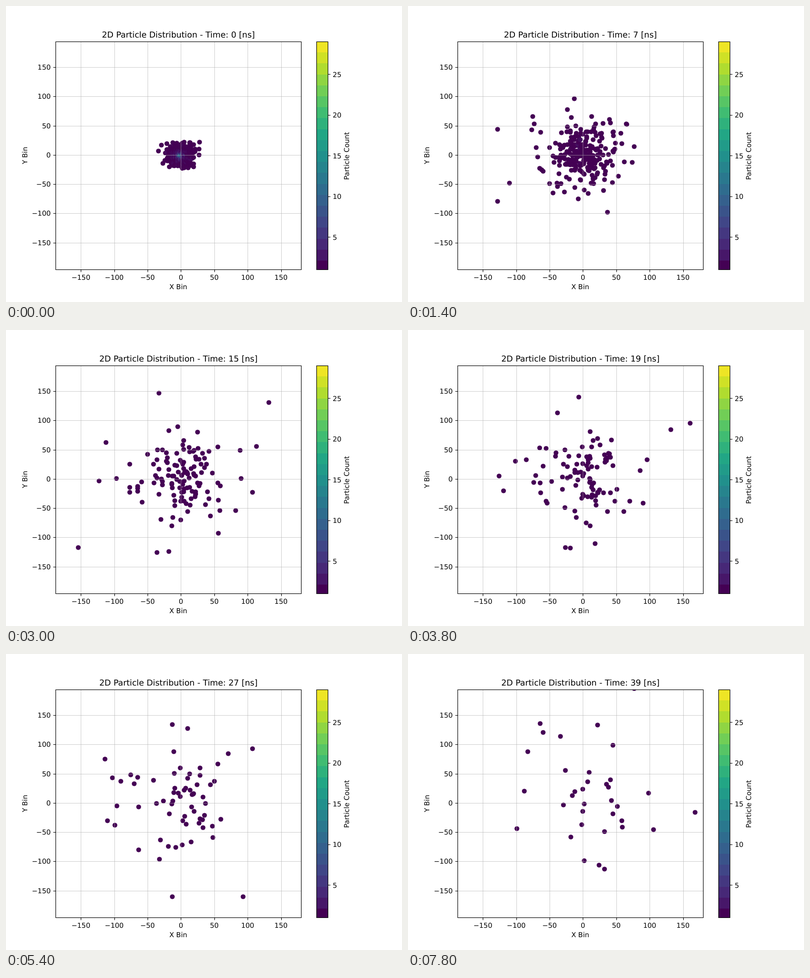
These frames come from a looping animation (800 px wide and 600 px high, 8 s). An HTML page with a canvas:

```html
<!DOCTYPE html>
<html lang="en">
<head>
<meta charset="utf-8">
<title>2D Particle Distribution</title>
<style>
  html, body { margin: 0; width: 100%; height: 100%; overflow: hidden; background: #fff; }
  canvas, svg { position: absolute; left: 0; top: 0; }
  text { font: 13.89px "DejaVu Sans", sans-serif; text-anchor: middle; text-rendering: geometricPrecision; }
  #title { font-size: 16.67px; }
</style>
</head>
<body>
<canvas id="dots" width="800" height="600"></canvas>
<svg id="chart" width="800" height="600" viewBox="0 0 800 600"></svg>
<script>
const STEP_MS = 200, STEPS = 40;
const PARTICLES = 1400, START_SPREAD = 3.8, STEP_SPREAD = 6.5, MAX_VARIANCE = 3.6;
const BOX = { x: 100, y: 72, w: 496, h: 462 };
const VIRIDIS = ['440154', '482475', '414487', '355f8d', '2a788e', '21918c',
  '22a884', '44bf70', '7ad151', 'bddf26', 'fde725']
  .map(hex => [0, 2, 4].map(i => parseInt(hex.slice(i, i + 2), 16)));

const toX = bin => 353.4 + bin * 1.348;
const toY = bin => 301.95 - bin * 1.185;
const crisp = v => Math.round(v) + 0.5;

function viridis(t) {
  const p = Math.min(Math.max(t, 0), 1) * (VIRIDIS.length - 1);
  const i = Math.min(Math.floor(p), VIRIDIS.length - 2);
  return `rgb(${VIRIDIS[i].map((c, k) => Math.round(c + (VIRIDIS[i + 1][k] - c) * (p - i)))})`;
}

function seededRandom(seed) {
  return () => {
    seed = (seed + 0x6D2B79F5) | 0;
    let r = Math.imul(seed ^ (seed >>> 15), 1 | seed);
    r = (r + Math.imul(r ^ (r >>> 7), 61 | r)) ^ r;
    return ((r ^ (r >>> 14)) >>> 0) / 4294967296;
  };
}
const random = seededRandom(2718);
const normal = () => Math.sqrt(-2 * Math.log(1 - random())) * Math.cos(2 * Math.PI * random());

// Pairs recombine quickly while the cloud is dense; later, particles slowly drop out.
const aliveAt = step => Math.round(PARTICLES / (1 + 0.6 * step) * Math.exp(-((step / 58) ** 2)));

// A random walk; its scale differs per particle, giving the cloud a dense core and long tails.
function makeWalk() {
  const variance = normal() ** 2 / 2 - Math.log(1 - random());
  const scale = Math.sqrt(2 * Math.min(MAX_VARIANCE, variance));
  let x = 0, y = 0;
  return Array.from({ length: STEPS }, (_, step) => {
    const spread = scale * (step ? STEP_SPREAD : START_SPREAD);
    x += spread * normal();
    y += spread * normal();
    return [x, y];
  });
}
const walks = Array.from({ length: PARTICLES }, makeWalk);

function binnedDots(step) {
  const bins = new Map();
  for (const walk of walks.slice(0, aliveAt(step))) {
    const [x, y] = walk[step].map(Math.round);
    const key = `${x},${y}`;
    const bin = bins.get(key) || { x, y, count: 0 };
    bin.count++;
    bins.set(key, bin);
  }
  return [...bins.values()].sort((a, b) => a.x - b.x || a.y - b.y);
}

const chart = document.getElementById('chart');
function add(tag, attrs, text = '') {
  const el = document.createElementNS('http://www.w3.org/2000/svg', tag);
  for (const name in attrs) el.setAttribute(name, attrs[name]);
  el.textContent = text;
  return chart.appendChild(el);
}
const line = (x1, y1, x2, y2, stroke = '#000', width = 1.1) =>
  add('line', { x1, y1, x2, y2, stroke, 'stroke-width': width });
const label = (x, y, text, attrs = {}) => add('text', { x, y, ...attrs }, text);
const sideLabel = (x, y, text) => label(0, 0, text, { transform: `translate(${x} ${y}) rotate(-90)` });
const frame = (x, y, width, height) =>
  add('rect', { x, y, width, height, fill: 'none', stroke: '#000', 'stroke-width': 1.1 });
const anchor = side => ({ style: `text-anchor:${side}` });

function drawAxes() {
  const right = BOX.x + BOX.w, bottom = BOX.y + BOX.h, grid = 'rgba(176,176,176,.6)';
  for (let v = -150; v <= 150; v += 50) {
    const x = crisp(toX(v)), y = crisp(toY(v)), text = String(v).replace('-', '\u2212');
    line(x, BOX.y, x, bottom, grid, 1);
    line(BOX.x, y, right, y, grid, 1);
    line(x, bottom + 0.5, x, bottom + 5.4);
    line(BOX.x - 4.4, y, BOX.x + 0.5, y);
    label(toX(v), 555, text);
    label(90.3, Math.round(toY(v) + 5), text, anchor('end'));
  }
  frame(BOX.x + 0.5, BOX.y + 0.5, BOX.w, BOX.h);
  label(348, 574, 'X Bin');
  sideLabel(43, 303, 'Y Bin');
}

function drawColorbar() {
  const bands = 20, size = 22.2;
  add('rect', { x: 627, y: 516, width: 23, height: 18, fill: viridis(0) });
  for (let i = 0; i < bands; i++) {
    const top = Math.round(BOX.y + i * size), end = Math.round(BOX.y + (i + 1) * size);
    add('rect', { x: 627, y: top, width: 23, height: end - top, fill: viridis(1 - (i + 0.5) * size / BOX.h) });
  }
  frame(627.5, BOX.y + 0.5, 23, BOX.h);
  for (let v = 5; v <= 25; v += 5) {
    const y = BOX.y + BOX.h - (v - 1) * 16.5;
    line(650.5, crisp(y), 655.4, crisp(y));
    label(660, Math.round(y + 5.7), v, anchor('start'));
  }
  sideLabel(693, 304, 'Particle Count');
}

drawAxes();
drawColorbar();
const title = label(348.3, 64, '', { id: 'title' });

const ctx = document.getElementById('dots').getContext('2d');
ctx.beginPath();
ctx.rect(BOX.x, BOX.y, BOX.w, BOX.h);
ctx.clip();

function draw(step) {
  title.textContent = `2D Particle Distribution - Time: ${step} [ns]`;
  ctx.clearRect(0, 0, 800, 600);
  for (const { x, y, count } of binnedDots(step)) {
    ctx.fillStyle = viridis((count - 1) / 28);
    ctx.beginPath();
    ctx.arc(Math.round(toX(x)), Math.round(toY(y)), 4.86, 0, 2 * Math.PI);
    ctx.fill();
  }
}

const start = performance.now();
let shown = -1;
function tick() {
  const step = Math.floor((performance.now() - start) / STEP_MS) % STEPS;
  if (step !== shown) draw(shown = step);
  requestAnimationFrame(tick);
}
tick();
</script>
</body>
</html>
```
